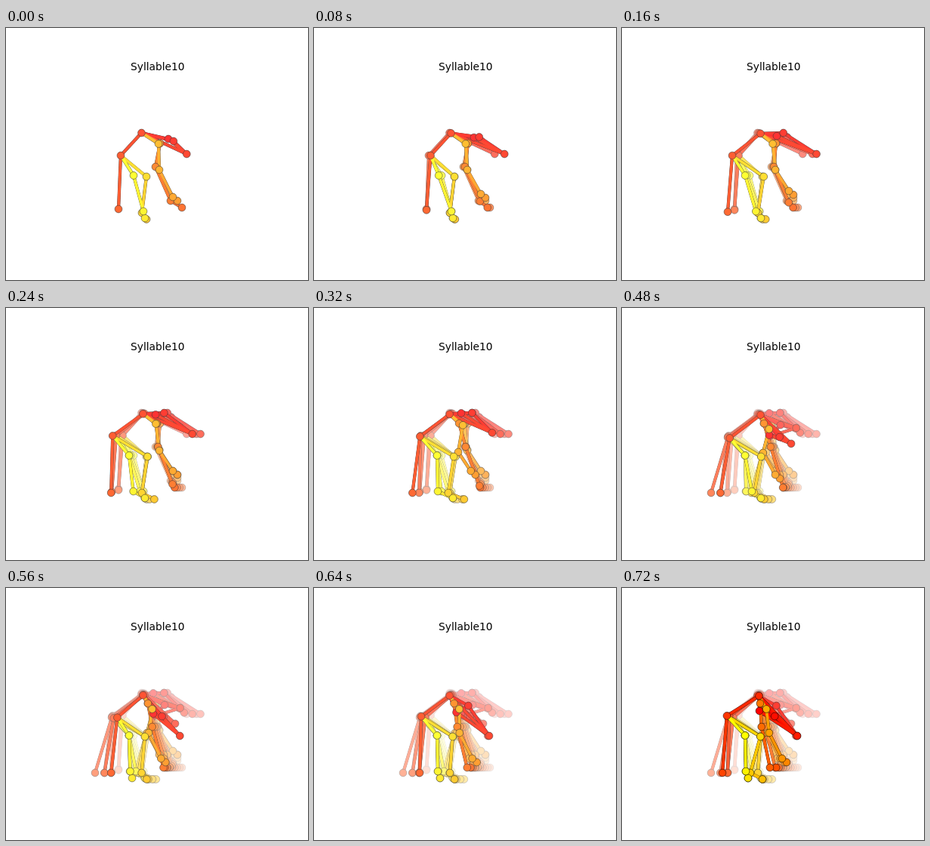
These frames come from a looping animation (400 px wide and 334 px high, 800 ms). An HTML page with a canvas:

```html
<!DOCTYPE html>
<html>
<head>
<meta charset="utf-8">
<style>
html, body { margin: 0; width: 100%; height: 100%; overflow: hidden; background: #fff; }
canvas { display: block; }
</style>
</head>
<body>
<canvas id="stage" width="400" height="334"></canvas>
<script>
const ctx = document.getElementById('stage').getContext('2d');
const POSES = 10, STEP = 80, FADE = 0.2;

const chain = (...ids) => ids.slice(1).map((id, i) => [ids[i], id]);
const bones = [
  ...chain('earL', 'earR', 'snout', 'spine', 'hip', 'tail'),
  ...chain('snout', 'earL', 'spine'), ...chain('earR', 'spine'),
  ...chain('pawL', 'wristL', 'elbowL', 'shoulderL', 'spine'),
  ...chain('pawR', 'wristR', 'elbowR', 'shoulderR', 'spine'),
  ...chain('footL', 'ankleL', 'kneeL', 'hip'),
  ...chain('footR', 'ankleR', 'kneeR', 'hip')
];

// Joint positions at time t, counted in poses. The key order sets the colours.
function poseAt(t) {
  const ease = (from, to) => {
    const u = Math.min(1, Math.max(0, (t - from) / (to - from)));
    return u * u * (3 - 2 * u);
  };
  const bump = (center, width) => Math.exp(-(((t - center) / width) ** 2));

  // The right foreleg lifts and swings back as one.
  const lift = 10 * ease(5, 7) - 8 * ease(0, 2);
  const swing = 9 * ease(6, 9) - 18 * ease(3, 4.5);

  return {
    earL: [215 - 20 * ease(0, 4) - 13 * ease(7, 9), 147 - 1.9 * t + 33 * ease(4, 5)],
    earR: [222 - 2.2 * t - 6 * bump(3, 1.5), 150 - 11 * ease(0, 2) + 32 * ease(4, 6) - 15 * bump(8, 0.6)],
    snout: [232 + 26 * bump(1.8, 1.6) - 8 * bump(6, 0.8), 167 + 29 * ease(5, 7) - 8 * bump(5, 0.8)],
    spine: [181.5 - 2 * Math.cos(t * Math.PI / 2), 139 + 0.45 * t],
    hip: [141.5 - 0.3 * t + 14 * bump(0.7, 1.3) + 8 * bump(7, 1), 169 + 3.5 * bump(6, 2)],
    tail: [149 - 9 * ease(1, 2) - 22 * bump(5, 1.1) - 7 * ease(8, 9), 240 + 5 * ease(0, 3)],

    pawL: [233 - 3.2 * t, 238],
    wristL: [218 + 2.5 * t - 0.55 * t * t, 229 + 9 * ease(0, 6)],
    elbowL: [198 + 2.4 * t - 0.43 * t * t, 184],
    shoulderL: [204 - 16 * ease(2, 5) - 5 * ease(7, 9), 153],

    pawR: [227 + swing, 229 + lift],
    wristR: [221 + swing, 224 + lift],
    elbowR: [203 + 0.9 * swing, 188 + 4 * ease(2, 5)],
    shoulderR: [202 - 1.2 * t, 153.5 + 7 * ease(3, 6)],

    footL: [186 + 13 * bump(3.8, 1.7), 253.5],
    ankleL: [180 - 9 * bump(5.2, 1) - 10 * ease(8, 9), 245],
    kneeL: [186 - 0.3 * t + 3 * bump(2.5, 1), 197],

    footR: [184 - 17 * ease(6, 7), 252],
    ankleR: [182 - 18 * ease(1, 4) + 8 * bump(6, 0.6), 243],
    kneeR: [163 + 6 * bump(0, 1), 195.5]
  };
}

const names = Object.keys(poseAt(0));
const colorOf = name => `rgb(255,${Math.round(255 * names.indexOf(name) / (names.length - 1))},0)`;

function drawBones(joints, width, color) {
  ctx.lineWidth = width;
  for (const [a, b] of bones) {
    ctx.strokeStyle = color(a);
    ctx.beginPath();
    ctx.moveTo(...joints[a]);
    ctx.lineTo(...joints[b]);
    ctx.stroke();
  }
}

function drawPose(joints) {
  drawBones(joints, 4.17, () => '#000');
  drawBones(joints, 3.75, colorOf);
  ctx.strokeStyle = '#000';
  ctx.lineWidth = 0.55;
  for (const name of names) {
    ctx.fillStyle = colorOf(name);
    ctx.beginPath();
    ctx.arc(...joints[name], 4.9, 0, 2 * Math.PI);
    ctx.fill();
    ctx.stroke();
  }
}

function draw() {
  const current = Math.floor(performance.now() / STEP) % POSES;
  ctx.fillStyle = '#fff';
  ctx.fillRect(0, 0, 400, 334);
  for (let pose = 0; pose <= current; pose++) {
    drawPose(poseAt(pose));
    // A translucent veil fades every pose except the closing one.
    if (pose < POSES - 1) {
      ctx.fillStyle = `rgba(255,255,255,${FADE})`;
      ctx.fillRect(0, 0, 400, 334);
    }
  }
  ctx.fillStyle = '#000';
  ctx.font = '13.8px "DejaVu Sans", sans-serif';
  ctx.textAlign = 'center';
  ctx.fillText('Syllable10', 200.8, 56);
  requestAnimationFrame(draw);
}
draw();
</script>
</body>
</html>
```
